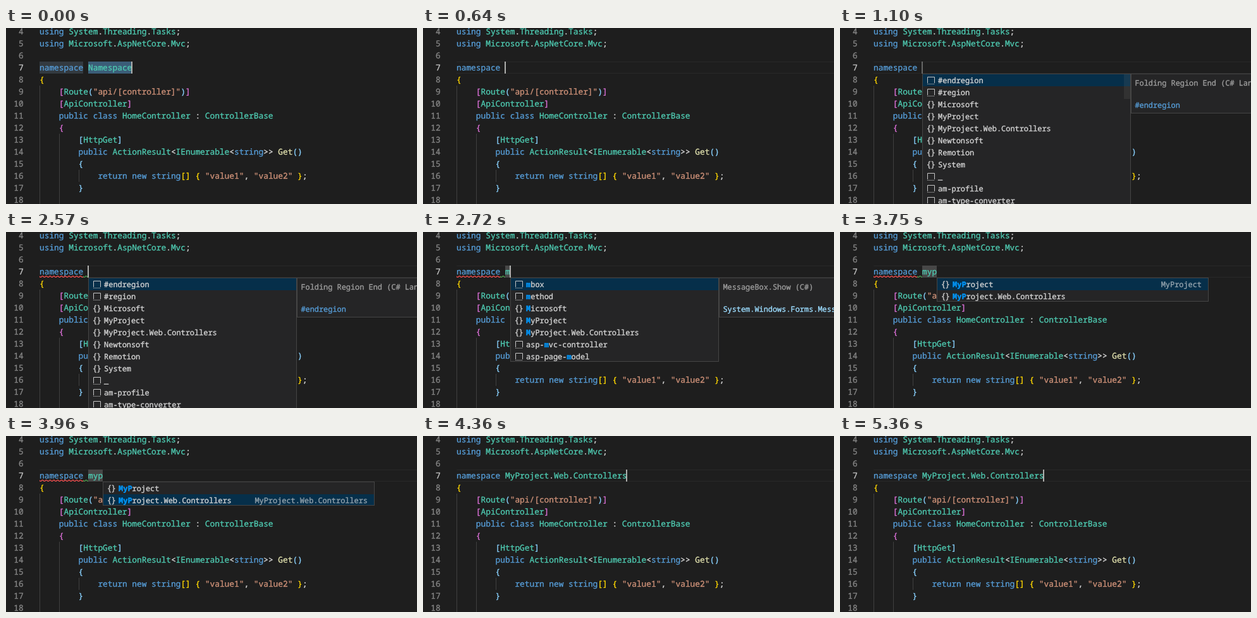
An HTML page with a canvas that plays this animation: 650 by 278 pixels, repeating every 5440 ms.

```html
<!DOCTYPE html>
<html lang="en">
<head>
<meta charset="utf-8">
<title>Namespace completion</title>
<style>
  html, body { margin: 0; width: 100%; height: 100%; overflow: hidden; background: #1e1e1e; }
  canvas { display: block; }
</style>
</head>
<body>
<canvas id="stage" width="650" height="278"></canvas>
<script>
const ctx = document.getElementById('stage').getContext('2d');
const LOOP = 5440;
const LINE = 19, LEFT = 53, COL = 7.7, LIST_TOP = 72;
const CODE_FONT = '12.83px "Noto Sans Mono", monospace';
const LIST_FONT = '11.92px "Noto Sans Mono", monospace';
const LIST_BOLD = 'bold ' + LIST_FONT;
const ICON_FONT = '13.5px "Noto Sans Mono", monospace';
const LIST_COL = 7.15;

const KEYWORDS = /^(using|namespace|public|class|return|new|string)$/;
const BRACKETS = ['#ffd700', '#da70d6', '#87cefa'];
const COLORS = { key: '#569cd6', type: '#4ec9b0', method: '#dcdcaa', text: '#ce9178', plain: '#d4d4d4' };

const FIRST_LINE = 4, EDITED = 7;
const code = [
  'using System.Threading.Tasks;',
  'using Microsoft.AspNetCore.Mvc;',
  '',
  '',
  '{',
  '    [Route("api/[controller]")]',
  '    [ApiController]',
  '    public class HomeController : ControllerBase',
  '    {',
  '        [HttpGet]',
  '        public ActionResult<IEnumerable<string>> Get()',
  '        {',
  '            return new string[] { "value1", "value2" };',
  '        }',
  ''
];
// Indent guides: column, first line, last line
const guides = [[0, 9, 18], [4, 13, 18], [8, 16, 16]];

const project = [['ns', 'MyProject'], ['ns', 'MyProject.Web.Controllers']];
const allItems = [
  ['snip', '#endregion'], ['snip', '#region'], ['ns', 'Microsoft'], ...project,
  ['ns', 'Newtonsoft'], ['ns', 'Remotion'], ['ns', 'System'],
  ['snip', '_'], ['snip', 'am-profile'], ['snip', 'am-type-converter'], ['snip', 'api-action']
];
const mItems = [
  ['snip', 'mbox'], ['snip', 'method'], ['ns', 'Microsoft'], ...project,
  ['snip', 'asp-mvc-controller'], ['snip', 'asp-page-model']
];
const regionDocs = ['Folding Region End (C# Language)', '#endregion', '#569cd6'];
const boxDocs = ['MessageBox.Show (C#)', 'System.Windows.Forms.MessageBox', '#9cdcfe'];

// Each stage holds until the next one starts.
const stages = [
  { at: 0, name: 'Namespace', selected: true },
  { at: 640, name: '' },
  { at: 1100, name: '', items: allItems, width: 330, docs: regionDocs, scroll: true },
  { at: 1170, name: '', items: allItems, width: 330, docs: regionDocs },
  { at: 2650, name: 'm', items: mItems, width: 330 },
  { at: 2720, name: 'm', items: mItems, width: 330, docs: boxDocs },
  { at: 2970, name: 'my', items: project, width: 430, detail: true },
  { at: 3270, name: 'myp', items: project, width: 430, detail: true },
  { at: 3960, name: 'myp', items: project, width: 430, detail: true, active: 1 },
  { at: 4360, name: 'MyProject.Web.Controllers' }
];
// Cursor blink: from, to, opacity
const blinks = [
  [320, 640, 0], [1100, 1170, 0.5], [1170, 1650, 0],
  [2110, 2570, 0], [3750, 4280, 0], [4830, 5360, 0]
];

const colX = col => LEFT + col * COL;
const snapX = col => Math.round(colX(col));
const lineY = n => 53 + (n - EDITED) * LINE;

function rect(color, x, y, w, h) {
  ctx.fillStyle = color;
  ctx.fillRect(x, y, w, h);
}

// A hairline stroke gives the text a slightly heavier weight.
function write(text, x, y, color, font, align = 'left') {
  ctx.font = font;
  ctx.textAlign = align;
  ctx.fillStyle = ctx.strokeStyle = color;
  ctx.lineWidth = 0.35;
  ctx.fillText(text, x, y);
  ctx.strokeText(text, x, y);
}

function panel(x, y, w, h) {
  rect('#454545', x, y, w, h);
  rect('#252526', x + 1, y + 1, w - 2, h - 2);
}

function markColumns(color, from, to) {
  rect(color, snapX(from), lineY(EDITED), snapX(to) - snapX(from), LINE);
}

function drawCode(stage) {
  let depth = 0;
  const bracketColor = ch => BRACKETS[('{[('.includes(ch) ? depth++ : --depth) % 3];
  const colorOf = token => {
    if (token[0] === '"') return COLORS.text;
    if (/[{}[\]()]/.test(token)) return bracketColor(token);
    if (KEYWORDS.test(token)) return COLORS.key;
    if (token === 'Get') return COLORS.method;
    return /\w/.test(token) ? COLORS.type : COLORS.plain;
  };
  code.forEach((source, i) => {
    const number = FIRST_LINE + i, base = lineY(number) + 14;
    const line = number === EDITED ? 'namespace ' + stage.name : source;
    write(number, 27.6, base, number === EDITED ? '#c6c6c6' : '#858585', CODE_FONT, 'right');
    for (const m of line.matchAll(/"[^"]*"|\w+|[^\s\w]/g))
      write(m[0], colX(m.index), base, colorOf(m[0]), CODE_FONT);
  });
}

function squiggle(color, from, to) {
  ctx.save();
  ctx.beginPath();
  ctx.rect(from, 69, to - from, 3);
  ctx.clip();
  ctx.beginPath();
  ctx.moveTo(from - 1.25, 69);
  for (let x = from; x < to; x += 6) {
    ctx.lineTo(x + 1.75, 72);
    ctx.lineTo(x + 4.75, 69);
  }
  ctx.strokeStyle = color;
  ctx.lineWidth = 1.3;
  ctx.stroke();
  ctx.restore();
}

function drawIcon(kind, x, y) {
  if (kind === 'ns') {
    write('{', x + 6.5, y + 14, '#c5c5c5', ICON_FONT);
    write('}', x + 13, y + 14, '#c5c5c5', ICON_FONT);
    return;
  }
  ctx.strokeStyle = '#c5c5c5';
  ctx.lineWidth = 1;
  ctx.beginPath();
  ctx.moveTo(x + 8.5, y + 14);
  ctx.lineTo(x + 8.5, y + 4.5);
  ctx.lineTo(x + 19.5, y + 4.5);
  ctx.lineTo(x + 19.5, y + 14);
  ctx.stroke();
  for (let dot = 8; dot < 20; dot += 2) rect('#c5c5c5', x + dot, y + 15, 1, 1);
}

function drawLabel(label, typed, x, y) {
  const start = typed ? label.toLowerCase().indexOf(typed) : 0;
  const end = start + typed.length;
  const part = (from, to, color, font) =>
    write(label.slice(from, to), x + from * LIST_COL, y, color, font);
  part(0, start, COLORS.plain, LIST_FONT);
  part(start, end, '#0097fb', LIST_BOLD);
  part(end, label.length, COLORS.plain, LIST_FONT);
}

function drawList({ items, name, width, docs, detail, scroll, active = 0 }) {
  const x = snapX(10 + name.length);
  const height = items.length * LINE, right = x + width;
  if (docs) {
    panel(right, LIST_TOP, 700 - right, 63);
    write(docs[0], right + 6.4, 91, '#9d9d9d', LIST_FONT);
    write(docs[1], right + 6.4, 126, docs[2], LIST_FONT);
  }
  panel(x, LIST_TOP, width, height);
  ctx.save();
  ctx.beginPath();
  ctx.rect(x + 1, LIST_TOP + 1, width - 2, height - 2);
  ctx.clip();
  items.forEach(([kind, label], i) => {
    const y = LIST_TOP + 1 + i * LINE;
    if (i === active) rect('#062f4a', x, y, width, LINE);
    drawIcon(kind, x, y);
    drawLabel(label, name, x + 25.1, y + 14);
    if (detail && i === active)
      write(label, right - 11, y + 14, '#94a3ad', LIST_FONT, 'right');
  });
  if (scroll) rect('rgba(121,121,121,.15)', right - 11, LIST_TOP + 1, 10, 39);
  ctx.restore();
}

function drawCursor(t, col) {
  const blink = blinks.find(([from, to]) => t >= from && t < to);
  ctx.globalAlpha = blink ? blink[2] : 1;
  rect('#aeafad', Math.round(colX(col) - 1.2), lineY(EDITED), 2, LINE);
  ctx.globalAlpha = 1;
}

function draw(t) {
  const stage = stages.findLast(s => s.at <= t);
  const end = 10 + stage.name.length;
  rect('#1e1e1e', 0, 0, 650, 278);

  if (stage.selected) {
    markColumns('#333a40', 0, 9);
    markColumns('#3b5d78', 10, 19);
  } else {
    rect('#282828', LEFT, lineY(EDITED), 650, 1);
    rect('#282828', LEFT, lineY(EDITED) + LINE - 1, 650, 1);
    if (stage.items) markColumns('#474747', 10, end);
  }
  for (const [col, from, to] of guides)
    rect('#404040', snapX(col), lineY(from), 1, (to - from + 1) * LINE);

  drawCode(stage);
  if (t >= 1400 && t < 4060) {
    squiggle('#f14c4c', 53, 122);
    squiggle('#4d9e4d', 122, 130);
  }
  if (stage.items) drawList(stage);
  drawCursor(t, end);
}

ctx.textRendering = 'geometricPrecision';
ctx.lineJoin = 'round';
const started = performance.now();
function tick() {
  draw((performance.now() - started) % LOOP);
  requestAnimationFrame(tick);
}
tick();
</script>
</body>
</html>
```
